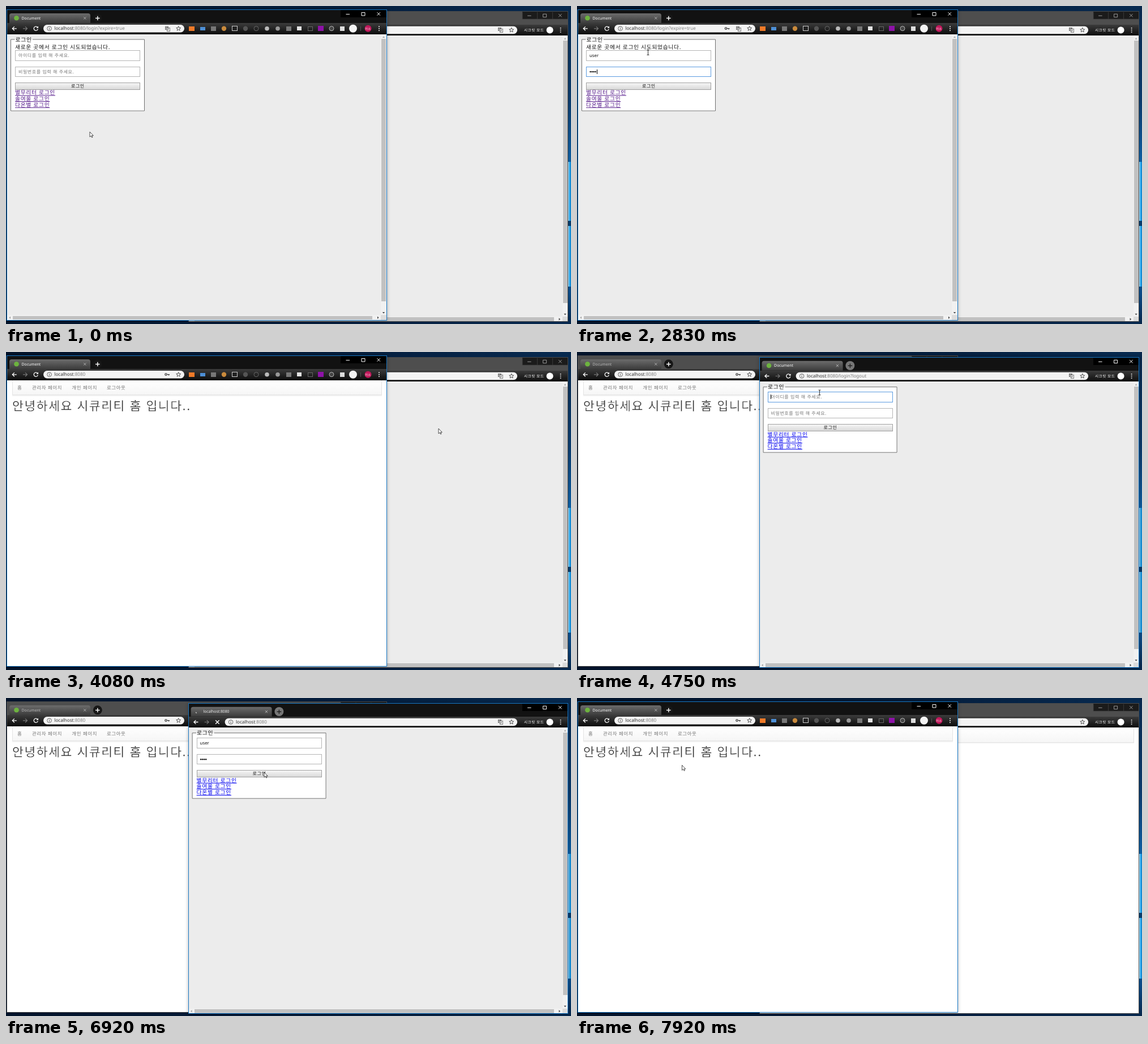
An HTML page that plays this animation: 998 px wide and 561 px high, repeating every 8000 ms.

```html
<!DOCTYPE html>
<html lang="ko">
<head>
<meta charset="utf-8">
<title>Login</title>
<style>
  html, body { margin: 0; width: 100%; height: 100%; overflow: hidden; background: #04162c; }
  svg { display: block; width: 100%; height: 100%; }
  text { font-family: "Noto Sans CJK KR", "Noto Sans CJK JP", sans-serif; letter-spacing: .07em; text-rendering: geometricPrecision; white-space: pre; }
  .ui { font-family: "Noto Sans", "Noto Sans CJK KR", sans-serif; letter-spacing: 0; }
  .link { text-decoration: underline .8px; text-underline-offset: 1px; text-decoration-skip-ink: none; }
  .thin { stroke: #fff; stroke-width: .35px; }
  rect { shape-rendering: crispEdges; }
  .soft { shape-rendering: auto; }
  .shadow { filter: blur(3px); opacity: .28; }
</style>
</head>
<body>
<svg viewBox="0 0 998 561" preserveAspectRatio="none">
  <defs>
    <linearGradient id="desk">
      <stop offset="0" stop-color="#03132a"/><stop offset=".6" stop-color="#051e3d"/><stop offset="1" stop-color="#072a50"/>
    </linearGradient>
    <linearGradient id="edge" x2="0" y2="1">
      <stop offset="0" stop-color="#07284c"/><stop offset=".3" stop-color="#0a3a6b"/><stop offset=".49" stop-color="#0c5c9f"/>
      <stop offset=".9" stop-color="#0a4a86"/><stop offset="1" stop-color="#06264a"/>
    </linearGradient>
    <linearGradient id="glow">
      <stop offset="0" stop-color="#bfe9ff"/><stop offset=".5" stop-color="#27a3e6"/><stop offset="1" stop-color="#0a80cc"/>
    </linearGradient>
    <linearGradient id="bar" x2="0" y2="1"><stop offset="0" stop-color="#3c3c3c"/><stop offset="1" stop-color="#0c0c0c"/></linearGradient>
    <linearGradient id="tab" x2="0" y2="1"><stop offset="0" stop-color="#6c6c6c"/><stop offset="1" stop-color="#3c3c3c"/></linearGradient>
    <linearGradient id="btn" x2="0" y2="1"><stop offset="0" stop-color="#f5f5f5"/><stop offset="1" stop-color="#dadada"/></linearGradient>
    <linearGradient id="nav" x2="0" y2="1"><stop offset="0" stop-color="#fff"/><stop offset="1" stop-color="#f6f6f6"/></linearGradient>
  </defs>
  <rect width="998" height="561" fill="url(#desk)"/>
  <rect x="993" width="5" height="561" fill="url(#edge)"/>
  <rect x="993" y="275" width="5" height="220" fill="url(#glow)"/>
  <rect x="993" y="379" width="5" height="9" fill="#083a68"/>
  <g id="scene"></g>
</svg>
<script>
const LOOP = 8000, TICKS_PER_MS = 12 / 1000;
const scene = document.getElementById('scene');

// Inner bounds of a browser window, inside its one pixel border.
const LEFT = 2, RIGHT = 671.6, TOP = 7.4, PAGE = 49.6, BOTTOM = 553.7;
const WIDTH = RIGHT - LEFT;

const rect = (x, y, w, h, fill, more = '') => `<rect x="${x}" y="${y}" width="${w}" height="${h}" fill="${fill}" ${more}/>`;
const circle = (x, y, r, fill, more = '') => `<circle cx="${x}" cy="${y}" r="${r}" fill="${fill}" ${more}/>`;
const line = (d, stroke, width = 1, more = '') => `<path d="${d}" fill="none" stroke="${stroke}" stroke-width="${width}" ${more}/>`;
const shape = (d, fill, more = '') => `<path d="${d}" fill="${fill}" ${more}/>`;
const text = (x, y, size, fill, s, more = '') => `<text x="${x}" y="${y}" font-size="${size}" fill="${fill}" ${more}>${s}</text>`;
const ui = (x, y, size, fill, s, more = '') => text(x, y, size, fill, s, 'class="ui" ' + more);

// Ticks (1/12 s) at which each window reacts.
const windows = {
  left: {
    x: 0, y: 0, pill: 249, notice: true, query: '/login?expire=true', link: '#551a8b',
    user: [15, 20, 21, 22], pass: [29, 30, 32, 34],
    focusUser: 7, focusPass: 24, blur: 40, load: 42, home: 47
  },
  right: {
    x: 320.6, y: 2.7, pill: 516.5, secret: true, query: '/login?logout', link: '#0000ee',
    user: [65, 66, 67, 68], pass: [74, 75, 76, 77],
    focusUser: 57, focusPass: 70, blur: 81, load: 82, home: 84
  }
};
const RAISE_RIGHT = 50, RAISE_LEFT = 93;

const pointer = [
  [0, 148, 222], [1, 148, 206], [4, 130, 105], [6, 125.5, 82], [35, 125.5, 82], [38, 168, 160],
  [40, 168, 142], [42, 180, 140], [46, 365.5, 150], [49, 764, 135], [50, 764, 135], [56, 428.5, 71.5],
  [77, 428.5, 71.5], [81, 456, 131], [83, 456, 131], [84, 459, 131], [85, 459, 131], [93, 185.5, 118.5], [96, 185.5, 118.5]
];

const typed = (ticks, k) => ticks.filter(t => t <= k).length;

function key(x) {
  return circle(x - 2, 39.6, 1.7, 'none', 'stroke="#444" stroke-width="1.3"') +
    line(`M${x} 39.6H${x + 4.5}M${x + 3} 39.6V41.6`, '#444', 1.3);
}

function translateIcon(x) {
  return rect(x - 4, 35.5, 5.5, 6, '#777') + rect(x - 1, 38, 5.5, 6, '#fff', 'stroke="#666" stroke-width=".8"') +
    line(`M${x} 40H${x + 3.5}M${x + 1.7} 39V40L${x} 43M${x + 1} 41L${x + 3.3} 43`, '#666', .7) +
    ui(x - 3.4, 40.5, 5, '#fff', 'G');
}

function star(x) {
  const points = Array.from({ length: 10 }, (_, i) => {
    const r = i % 2 ? 1.8 : 4.2, a = i * Math.PI / 5;
    return (x + r * Math.sin(a)).toFixed(1) + ',' + (39.8 - r * Math.cos(a)).toFixed(1);
  });
  return `<polygon points="${points.join(' ')}" fill="none" stroke="#444" stroke-width=".9"/>`;
}

function extensions() {
  const box = (x, w, h, fill, more) => rect(x - w / 2, 39.7 - h / 2, w, h, fill, more);
  const ring = 'stroke-width="1" stroke=';
  return box(328, 10, 8, '#f07a28') + box(347.5, 9, 6, '#4d8fd6') + box(366.5, 9, 8, '#777') +
    circle(385, 39.7, 4.2, '#c98a3c') + box(404, 9, 8, '#222', ring + '"#ccc"') +
    circle(423, 39.7, 4.2, '#555') + circle(442, 39.7, 4, 'none', ring + '"#666"') +
    circle(461, 39.7, 3.8, '#bbb') + circle(480, 39.7, 3.8, '#999') + box(499, 9, 8, '#777') +
    box(518, 8, 7, '#e4e4e4') + box(537, 8, 7, 'none', ring + '"#666"') + box(555.5, 10, 9, '#8e12a8') +
    circle(575, 39.7, 4, '#444', ring + '"#bbb"') + box(594, 8, 8, '#ddd') +
    circle(613, 39.7, 7, '#f4f4f4') + rect(626, 36, 1, 8, '#555') + circle(639.5, 39.7, 6, '#c2185b') +
    text(639.5, 41.7, 5, '#fff', '미소', 'text-anchor="middle"');
}

function chrome(w, k, active) {
  const loading = k >= w.load && k < w.home, home = k >= w.home;
  const ink = active ? '#fff' : '#999', pillEnd = 66 + w.pill;
  const query = k < w.load ? w.query : '';
  const frame = fill => [LEFT - 1, TOP - 1, WIDTH + 2, BOTTOM - TOP + 2, fill];
  let out = (active ? rect(...frame('#000'), 'class="shadow"') : '') +
    rect(...frame(active ? '#1777c4' : '#4a4a4a')) +
    rect(LEFT, TOP, WIDTH, 30 - TOP, active ? '#121212' : '#4e4e4e') +
    rect(LEFT, 30, WIDTH, PAGE - 30, 'url(#bar)') +
    rect(591, TOP, RIGHT - 591, 13, active ? '#000' : '#1b1b1b') +
    (active ? '' : line('M591.5 8V20.5H671.5M618 8V20M645 8V20', '#444', .8)) +
    line('M600.5 14.5H607M628 11.5H634V17H628ZM655.5 11.2L661 16.7M661 11.2L655.5 16.7', ink, 1) +
    shape('M6 30V17Q6 13 10 13H145Q149 13 149 17V30Z', 'url(#tab)');

  out += loading
    ? line('M18 16.5A3.5 3.5 0 0 1 20 17.5', '#ddd', 1.2, `transform="rotate(${(k - 46) * 45 - 15} 18 20.5)"`) +
      ui(27.8, 23.6, 6.8, '#eee', 'localhost:8080')
    : circle(18.5, 21.3, 4.3, '#6db33f') + ui(27.5, 23.6, 6.9, active ? '#fff' : '#bbb', 'Document');
  out += line('M137.2 19.3L141.4 23.5M141.4 19.3L137.2 23.5', '#bbb', .9) +
    circle(161.8, 21.3, 8, w.secret ? '#777' : '#161616') +
    line('M158 21.5H165.6M161.8 17.7V25.3', w.secret ? '#222' : '#fff', 1.4);

  out += line('M18.8 39.8H11.5M14.8 36.4L11.3 39.8L14.8 43.2', '#fff', 1.3) +
    line('M30 39.8H37.3M34 36.4L37.5 39.8L34 43.2', '#777', 1.2) +
    (loading
      ? line('M49.5 36.5L56 43M56 36.5L49.5 43', '#fff', 1.4)
      : line('M55.7 37.6A3.6 3.6 0 1 0 56.3 40.6', '#fff', 1.3) + shape('M57 35.5V39H53.5Z', '#fff'));

  out += rect(66, 33, w.pill, 13.5, '#f3f3f3', 'rx="6.7" class="soft"') +
    circle(76.5, 39.7, 3.8, 'none', 'stroke="#555" stroke-width=".9"') +
    line('M76.5 39.2V41.8M76.5 37.4V38.3', '#555', 1) +
    ui(85.3, 42.4, 8.1, '#333', `localhost<tspan fill="#808080">:8080${query}</tspan>`) +
    star(pillEnd - 10.3);
  const showTranslate = w.secret ? !home : k < w.load;
  if (showTranslate) out += translateIcon(pillEnd - 30);
  if (!w.secret && k >= 30) out += key(k < w.load ? 265 : 284.5);

  out += w.secret
    ? text(594.3, 42.1, 6.7, '#fff', '시크릿 모드') + circle(640, 39.8, 6, '#fff')
    : extensions();
  return out + [36.2, 39.7, 43.2].map(y => circle(659, y, .95, '#fff')).join('');
}

function scrollbars() {
  return rect(662, PAGE, RIGHT - 662, BOTTOM - PAGE, '#f1f1f1') + rect(LEFT, 545, WIDTH, BOTTOM - 545, '#f1f1f1') +
    rect(662, 545, RIGHT - 662, BOTTOM - 545, '#dcdcdc') +
    rect(663, 58, 8, 463, '#c1c1c1') + rect(12, 546.5, 635, 6.5, '#c1c1c1') +
    shape('M664.8 56L667 53.5L669.2 56Z', '#a3a3a3') + shape('M664.8 540L667 542.5L669.2 540Z', '#444') +
    shape('M8 547.5L5.5 549.7L8 552Z', '#a3a3a3') + shape('M656 547.5L658.5 549.7L656 552Z', '#444');
}

function field(y, focused, hint, value, caretX) {
  const edge = focused ? '#5b9be0' : '#b5b5b5';
  return rect(16, y, 221.3, 18.5, edge) + rect(17, y + 1, 219.3, 16.5, '#fff') +
    (value || text(22, y + 12, 8, '#777', hint)) +
    (caretX ? rect(caretX, y + 5, 1, 8, '#000') : '');
}

function loginPage(w, k) {
  const userCount = typed(w.user, k), passCount = typed(w.pass, k);
  const onUser = k >= w.focusUser && k < w.focusPass, onPass = k >= w.focusPass && k < w.blur;
  const lastAct = Math.max(...[w.focusUser, w.focusPass, ...w.user, ...w.pass].filter(t => t <= k));
  const blinkOn = (k - lastAct) % 12 < 6;
  const dy = w.notice ? 0 : -10.5;
  const dots = Array.from({ length: passCount }, (_, i) => circle(23.6 + 3 * i, 116 + dy, 1.25, '#111')).join('');
  const name = userCount ? ui(22, 90 + dy, 7.8, '#111', 'user'.slice(0, userCount)) : '';

  return rect(LEFT, PAGE, WIDTH, BOTTOM - PAGE, '#ececec') +
    rect(8, 59, 237, 126.5 + dy, '#fff') +
    line(`M15.5 59H8.5V${185 + dy}H244.5V59H47`, '#707070') +
    text(16.5, 62.6, 9.8, '#111', '로그인') +
    (w.notice ? text(16, 76.4, 9.75, '#111', '새로운 곳에서 로그인 시도되었습니다.') : '') +
    field(78 + dy, onUser, '아이디를 입력 해 주세요.', name, onUser && blinkOn && 21.8 + [0, 5, 9, 13, 16][userCount]) +
    field(106.5 + dy, onPass, '비밀번호를 입력 해 주세요.', dots, onPass && blinkOn && 21.8 + 3.2 * passCount) +
    rect(16, 135 + dy, 221.3, 12.5, '#a0a0a0') + rect(17, 136 + dy, 219.3, 10.5, 'url(#btn)') +
    text(126.9, 144.3 + dy, 8, '#111', '로그인', 'text-anchor="middle"') +
    ['별무리터', '솔여울', '다온별'].map((site, i) =>
      text(16, 156.4 + dy + 10.7 * i, 9.75, w.link, site + ' 로그인', 'class="link"')).join('') +
    scrollbars();
}

function homePage(w, k) {
  const menu = [[20, '홈'], [46, '관리자 페이지'], [116.3, '개인 페이지'], [178, '로그아웃']];
  const waiting = w.secret && k < 86;
  return rect(LEFT, PAGE, WIDTH, BOTTOM - PAGE, '#fff') +
    rect(11, PAGE, 652.5, 28, '#f2f2f2') + rect(11, PAGE, 652.5, 26.4, '#e4e4e4') + rect(12, PAGE, 650.5, 25.4, 'url(#nav)') +
    menu.map(([x, s]) => text(x, 65.8, 8.45, '#777', s)).join('') +
    text(11, 103.4, 21.6, '#2b2b2b', '안녕하세요 시큐리티 홈 입니다..', 'class="thin"') +
    (waiting ? rect(LEFT, 543.5, 221.4, BOTTOM - 543.5, '#000') + text(3.5, 551.4, 7.1, '#a8a8a8', 'localhost의 응답을 기다리는 중...') : '');
}

function browser(w, k, active) {
  const page = k < w.home ? loginPage(w, k) : homePage(w, k);
  return `<g transform="translate(${w.x} ${w.y})">${chrome(w, k, active)}${page}</g>`;
}

function cursor(k) {
  const i = Math.max(1, pointer.findIndex(p => p[0] >= k));
  const [t0, x0, y0] = pointer[i - 1], [t1, x1, y1] = pointer[i];
  const f = (k - t0) / (t1 - t0);
  const overField = (k >= 4 && k < 37) || (k >= 55 && k < 79);
  const glyph = overField
    ? line('M-2 -4.3H2M0 -4.3V4.3M-2 4.3H2', '#333', 1)
    : shape('M0 0V9L2.2 7.1L3.7 10L5 9.4L3.6 6.6H6.3Z', '#fff', 'stroke="#222" stroke-width=".8"');
  return `<g transform="translate(${x0 + (x1 - x0) * f} ${y0 + (y1 - y0) * f})">${glyph}</g>`;
}

let shown = -1;
function draw(now) {
  const k = Math.floor(((now % LOOP) + 4) * TICKS_PER_MS) % 96;
  if (k !== shown) {
    shown = k;
    const rightOnTop = k >= RAISE_RIGHT && k < RAISE_LEFT;
    const left = browser(windows.left, k, !rightOnTop), right = browser(windows.right, k, rightOnTop);
    scene.innerHTML = (rightOnTop ? left + right : right + left) + cursor(k);
  }
  requestAnimationFrame(draw);
}
draw(performance.now());
</script>
</body>
</html>
```
